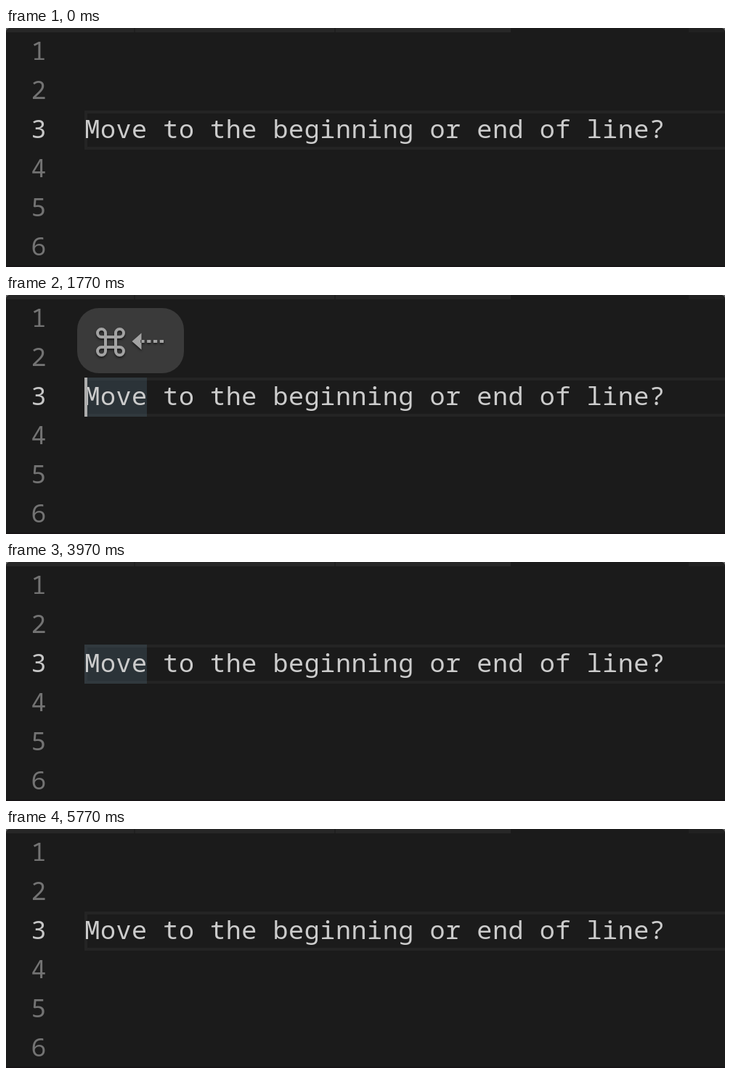
Recreate the animation shown at these times as an HTML page with a canvas. Size 990 by 330 pixels, loop 5910 ms.

```html
<!DOCTYPE html>
<html lang="en">
<head>
<meta charset="utf-8">
<title>Line navigation</title>
<style>
  html, body { margin: 0; width: 100%; height: 100%; overflow: hidden; background: #1b1b1b; }
  canvas { display: block; }
</style>
</head>
<body>
<canvas id="stage" width="990" height="330"></canvas>
<script>
const LOOP = 5910;
const FRAME = 100 / 3;
const ROW = 54;
const CELL = 21.6;
const LEFT = 108;
const LINE_TOP = 114;
const BASELINE = 44;
const TEXT = 'Move to the beginning or end of line?';
const BG = '#1b1b1b';

// Caret visibility: [on, off, column]
const CARET = [
  [430, 930, TEXT.length],
  [1430, 1500, TEXT.length],
  [1500, 2000, 0],
  [2500, 3000, 0],
  [3500, 3970, 0],
  [4270, 4770, TEXT.length],
  [5270, 5770, TEXT.length]
];
// Shortcut badge: shown at, starts fading at, arrow direction
const BADGES = [
  { from: 1500, fade: 2400, dir: -1 },
  { from: 4270, fade: 5200, dir: 1 }
];
const WORD = { from: 1770, to: 4270, length: 4 };

const ctx = document.getElementById('stage').getContext('2d');

function box(color, x, y, w, h) {
  ctx.fillStyle = color;
  ctx.fillRect(x, y, w, h);
}

function mono(str, x, y, color) {
  ctx.fillStyle = color;
  ctx.fillText(str, x, y);
}

function drawCommand(g, cx, cy) {
  const side = 7, mid = 12.5, r = mid - side;
  g.beginPath();
  for (let i = 0; i < 4; i++) {
    g.save();
    g.translate(cx, cy);
    g.rotate(i * Math.PI / 2);
    g.moveTo(-mid, side);
    g.lineTo(mid, side);
    g.arc(mid, mid, r, -Math.PI / 2, Math.PI);
    g.restore();
  }
  g.stroke();
}

function drawArrow(g, cx, cy, dir) {
  g.save();
  g.translate(cx, cy);
  g.scale(dir, 1);
  g.beginPath();
  g.moveTo(22, 0);
  g.lineTo(9, -11.5);
  g.lineTo(9, 11.5);
  g.closePath();
  for (let i = 0; i < 4; i++) g.rect(-21.5 + i * 8.8, -2, 5.2, 4);
  g.fill();
  g.restore();
}

// Drawn on its own layer so that it can fade as one piece
function makeBadge(dir) {
  const c = document.createElement('canvas');
  c.width = 990;
  c.height = 330;
  const g = c.getContext('2d');
  g.fillStyle = '#3a3a3a';
  g.beginPath();
  g.roundRect(98, 18, 147, 90, 30);
  g.fill();
  g.shadowColor = 'rgba(0,0,0,.55)';
  g.shadowBlur = 3;
  g.shadowOffsetY = 2;
  g.fillStyle = g.strokeStyle = '#a3a3a3';
  g.lineWidth = 4;
  drawCommand(g, 144, 65);
  drawArrow(g, 195.5, 64, dir);
  return c;
}

function drawChrome() {
  box(BG, 0, 0, 990, 330);
  box('#272727', 0, 0, 695, 6);
  box(BG, 176.5, 0, 1, 6);
  box(BG, 452.5, 0, 1, 6);
  box('#212121', 940, 0, 50, 6);
  box('#171516', 0, 328, 990, 2);
  // rounded window corners
  ctx.fillStyle = '#686868';
  for (const x of [0, 990]) {
    const s = x ? -1 : 1;
    ctx.beginPath();
    ctx.moveTo(x, 0);
    ctx.lineTo(x + 4 * s, 0);
    ctx.quadraticCurveTo(x + s, 1, x, 4);
    ctx.fill();
  }
}

function drawLineBorder() {
  const color = '#242424';
  box(color, LEFT, LINE_TOP, 882, 4);
  box(color, LEFT, LINE_TOP + 50, 882, 4);
  box(color, LEFT, LINE_TOP, 4, ROW);
}

function drawText() {
  ctx.font = '35px "Noto Sans Mono", "DejaVu Sans Mono", monospace';
  ctx.letterSpacing = '0.6px';
  ctx.textBaseline = 'alphabetic';
  for (let n = 1; n <= 6; n++) {
    mono(String(n), 34.5, BASELINE + (n - 1) * ROW, n === 3 ? '#c6c6c6' : '#737373');
  }
  mono(TEXT, LEFT + 0.3, BASELINE + 2 * ROW, '#cccccc');
}

for (const b of BADGES) b.image = makeBadge(b.dir);

function badgeAlpha(b, t) {
  if (t < b.from) return 0;
  if (t < b.fade) return 1;
  const step = Math.floor((t - b.fade) / FRAME + 0.1);
  return Math.max(0, 0.78 - 0.16 * step);
}

function render(t) {
  drawChrome();
  drawLineBorder();
  if (t >= WORD.from && t < WORD.to) {
    box('rgba(72,96,108,.36)', LEFT, LINE_TOP, Math.round(WORD.length * CELL), ROW);
  }
  drawText();
  for (const [on, off, col] of CARET) {
    if (t >= on && t < off) {
      box('#adadad', LEFT + Math.floor(col * CELL) - (col ? 1 : 0), LINE_TOP, 4, ROW);
    }
  }
  for (const b of BADGES) {
    ctx.globalAlpha = badgeAlpha(b, t);
    ctx.drawImage(b.image, 0, 0);
  }
  ctx.globalAlpha = 1;
}

const start = performance.now();
function tick() {
  render((performance.now() - start) % LOOP);
  requestAnimationFrame(tick);
}
tick();
</script>
</body>
</html>
```
